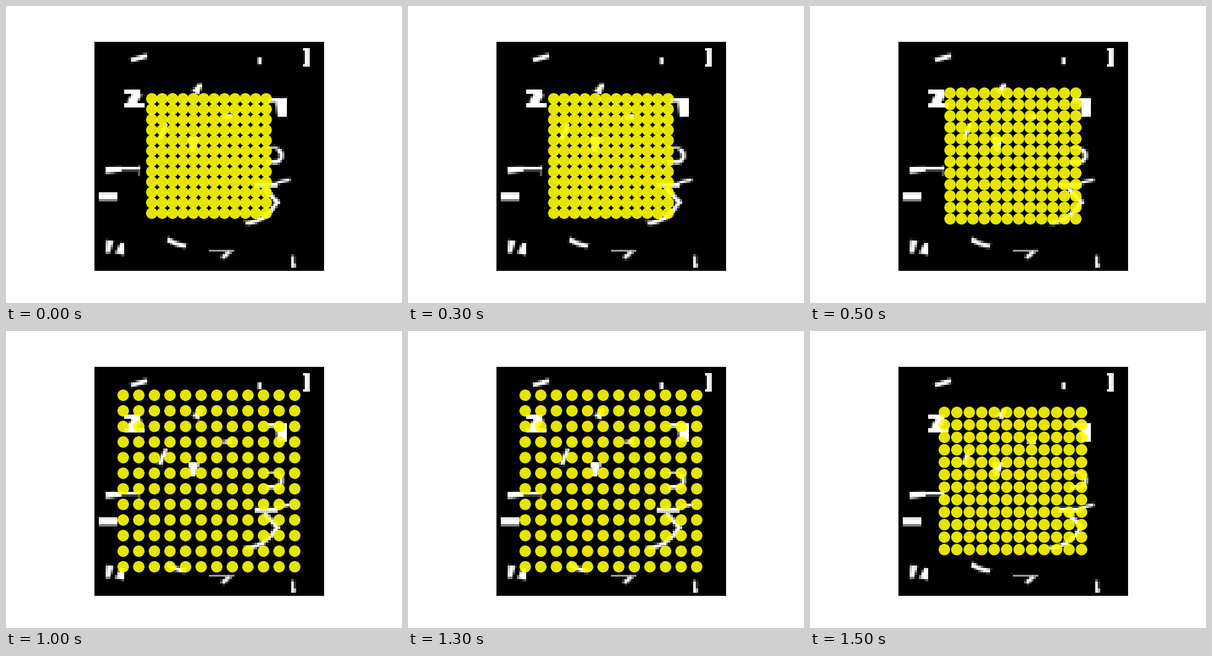
A matplotlib script for the animation above (2 s loop, 640 by 480 pixels).

```python
import numpy as np
import matplotlib.pyplot as plt
from matplotlib.animation import FuncAnimation
from matplotlib.patches import Circle

SIZE = 100                    # cells per side of the picture
DOTS = 12                     # the lattice is DOTS x DOTS
RADIUS = 2.5
ZOOMS = [0.5, 0.55, 0.75, 0.6]   # share of the picture the lattice spans

picture = np.zeros((SIZE, SIZE))
row, col = np.mgrid[:SIZE, :SIZE] + 0.5


def mark(start, end, w0, w1=None, sag=0):
    """Flat-ended brush mark that tapers from w0 to w1 and bows by sag."""
    w1 = w0 if w1 is None else w1
    (x0, y0), (x1, y1) = start, end
    length = np.hypot(x1 - x0, y1 - y0)
    dx, dy = (x1 - x0) / length, (y1 - y0) / length
    along = (col - x0) * dx + (row - y0) * dy
    across = (row - y0) * dx - (col - x0) * dy
    t = np.clip(along / length, 0, 1)
    slope = 4 * sag * (1 - 2 * t) / length
    dist = np.abs(across - 4 * sag * t * (1 - t)) / np.hypot(1, slope)
    half = (w0 + (w1 - w0) * t) / 2
    side = np.clip(half + 0.5 - dist, 0, np.minimum(1, 2 * half))
    ends = np.clip(np.minimum(along, length - along) + 0.5, 0, 1)
    np.maximum(picture, side * ends, out=picture)


# top
mark((16, 8.3), (23, 6.3), 1.9)
mark((72.2, 7), (72.2, 10.1), 1.6)
mark((92.9, 3), (92.9, 11), 2)
for y in (3.5, 10.5):
    mark((91, y), (93, y), 0.9)

# upper left block
mark((13, 22), (20, 22), 2)
mark((19, 22.5), (16, 27.5), 4)
mark((13, 28), (22, 28), 2)

# flecks and wedges
mark((44, 22.6), (46.6, 18.6), 3.6, 1.4)
mark((76, 25.8), (84, 25.8), 1.8)
mark((81.5, 25), (82, 33), 5, 4)
mark((56, 33.2), (60, 32.8), 0.8, 2.6)
mark((31.4, 36), (28.4, 43), 1.6, 2.2)
mark((43.5, 42), (42.8, 48), 5.4, 1.8)

# hook and large curve on the right
mark((75, 46.5), (80, 46.5), 0.7)
mark((80, 46.5), (77, 53.2), 2.2, 1.6, sag=-3.2)
mark((75, 53), (79, 52.6), 1.6)
mark((79.5, 61.8), (85.5, 60.4), 1.4)
mark((70, 62.8), (80, 62.8), 2)
mark((74, 64), (80.5, 71), 2)
mark((80, 69.5), (66, 79.5), 1.9, sag=-2.4)

# left
mark((5, 56.4), (12, 55.8), 2.8, 2)
mark((11, 55.6), (20, 55.6), 1.3)
mark((19.5, 54), (19.5, 59), 0.35)
mark((2, 67.8), (10, 67.8), 3.4)

# bottom
mark((6.8, 87), (5.8, 92.6), 3, 1.6)
mark((12.2, 88), (11, 93), 1.6, 4)
mark((32, 86.5), (40, 89.4), 2, sag=0.5)
mark((50, 91.5), (61, 91.5), 0.6)
mark((59.5, 91.4), (55.8, 94.8), 1.7)
mark((86.6, 93.6), (86.6, 99), 1.2)
mark((86, 98), (88, 98), 1.4)

fig, ax = plt.subplots(figsize=(6.4, 4.8), dpi=100)
ax.imshow(picture, cmap="gray", vmin=0, vmax=1, interpolation="nearest",
          extent=(0, SIZE, SIZE, 0))
ax.set(xlim=(0, SIZE), ylim=(SIZE, 0), xticks=[], yticks=[])

ticks = np.linspace(-1, 1, DOTS)
lattice = [(u, v) for v in ticks for u in ticks]
dots = [ax.add_patch(Circle((0, 0), RADIUS, fc="yellow", ec="none", alpha=0.9))
        for _ in lattice]


def draw(step):
    for dot, (u, v) in zip(dots, lattice):
        dot.center = (SIZE / 2 * (1 + ZOOMS[step] * u),
                      SIZE / 2 * (1 + ZOOMS[step] * v))
    return dots


anim = FuncAnimation(fig, draw, frames=len(ZOOMS), interval=500, repeat=True, repeat_delay=0)
plt.show()
```
